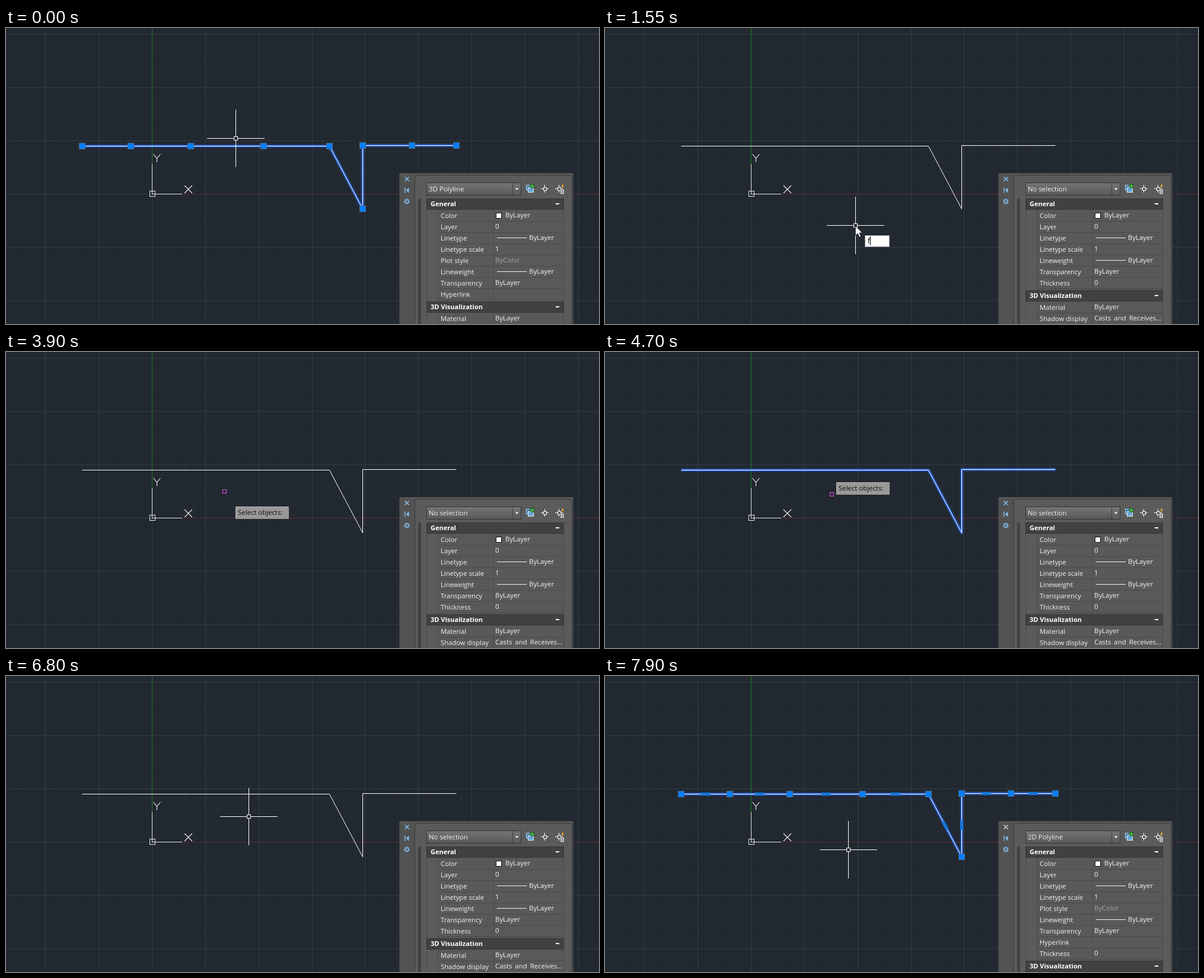
Recreate the animation shown at these times as an HTML page. Size 1000 px wide and 500 px high, loop 8 s.

```html
<!DOCTYPE html>
<html lang="en">
<head>
<meta charset="utf-8">
<title>Flatten a polyline</title>
<style>
  html, body { margin: 0; width: 100%; height: 100%; overflow: hidden; background: #212830; }
  svg { display: block; width: 100%; height: 100%; }
  text { font-family: "Open Sans", "Noto Sans", sans-serif; font-size: 11.4px; white-space: pre; }
  .crisp { shape-rendering: crispEdges; }
  .label { font-size: 11.2px; fill: #f2f2f2; }
  .value { fill: #f2f2f2; }
  .head { font-size: 11px; font-weight: 700; fill: #fff; }
  .entry { font-size: 11.8px; fill: #000; }
  .tip { fill: #0c0c0c; }
</style>
</head>
<body>
<svg viewBox="0 0 1000 500" xmlns="http://www.w3.org/2000/svg">
  <defs>
    <linearGradient id="combo" x1="0" y1="0" x2="0" y2="1">
      <stop offset="0" stop-color="#757575"/><stop offset="1" stop-color="#585858"/>
    </linearGradient>
  </defs>
  <g id="grid" class="crisp" fill="none"></g>
  <g id="ucs" fill="none" stroke="#e8e8e8"></g>
  <g id="glow" fill="none" stroke-linejoin="round"></g>
  <g id="line" fill="none"></g>
  <g id="grips" class="crisp"></g>
  <g id="mids" fill="#1676dc"></g>
  <g id="cross" class="crisp" fill="none"></g>
  <g id="panel"></g>
  <g id="arrow"><path d="M422.5 334.500v16l3.700-3.400 2.700 6.100 2.600-1.100-2.700-6.100h5z" fill="#fff" stroke="#20242a" stroke-width=".8"/></g>
  <g id="popup"></g>
  <g id="entry">
    <rect id="entryBox" x="438.500" y="350.500" height="19" fill="#fff" stroke="#8b8f94" class="crisp"/>
    <rect id="mark" y="352" height="16" fill="#3399ff"/>
    <text id="typed" class="entry" x="443" y="364"></text>
    <text id="rest" class="entry" y="364" style="fill:#fff"></text>
    <rect id="caret" y="352" width="1" height="15" fill="#000"/>
  </g>
  <g id="select"></g>
  <g id="prompt"></g>
</svg>
<script>
const LOOP = 8000, TICK = 50;
const $ = id => document.getElementById(id);
const rect = (x, y, w, h, more = "") => `<rect x="${x}" y="${y}" width="${w}" height="${h}" ${more}/>`;
const path = (d, more = "") => `<path d="${d}" ${more}/>`;
const text = (x, y, cls, s, more = "") => `<text x="${x}" y="${y}" class="${cls}" ${more}>${s}</text>`;
const show = (id, on) => { $(id).style.display = on ? "" : "none"; };
const within = (t, a, b) => t >= a && t < b;

// Cursor keys: time, x, y
const MOVES = [
  [0, 387, 186], [100, 424, 268], [200, 464, 354], [300, 464, 354], [400, 422, 333],
  [3750, 422, 333], [3850, 369, 243], [3900, 368, 235], [4000, 372, 202],
  [4650, 372, 202], [4700, 382, 240], [4750, 376, 257],
  [6600, 376, 257], [6650, 345, 252], [6700, 330, 248], [6750, 350, 245], [6800, 409, 237],
  [6950, 409, 237], [7100, 424, 101], [7250, 427, 199],
  [7600, 427, 199], [7750, 407, 279], [7850, 407, 279], [7900, 410, 293]
];

const VERTS = [[128, 199], [210, 199], [311, 199], [434, 199], [545, 199],
  [601, 305], [601, 198], [684, 198], [759, 198]];
const LINE = "M" + VERTS.map(([x, y]) => `${x + .5} ${y + .5}`).join("L");

const COMMAND = "flatten";
const KEY_TIMES = [1550, 1650, 1800, 1950, 2100, 2200, 2250];
const PLUGIN = "NELD_FLATTEN";

function drawScene() {
  const step = 89.85;
  const lines = (gap, skip) => {
    let d = "";
    for (let i = -14; i <= 42; i++) {
      if (skip && i % 5 === 0) continue;
      const x = Math.round(246 + i * gap) + .5, y = Math.round(280 + (i - 7) * gap) + .5;
      if (x > 0 && x < 1000) d += `M${x} 0V500`;
      if (skip || (i - 7) % 1 === 0) if (y > 0 && y < 500) d += `M0 ${y}H1000`;
    }
    return d;
  };
  $("grid").innerHTML =
    path(lines(step / 5, false), 'stroke="#262d37"') +
    path(lines(step, false), 'stroke="#323a47"') +
    path("M246.5 0V230", 'stroke="#1c791f"') +
    path("M297 280.5H1000", 'stroke="#6c262b"');
  $("ucs").innerHTML =
    path("M246.5 230V275M251 280.500H297M242.500 275.500h9v9h-9zM246.500 276v4.500h5", 'class="crisp"') +
    path("M248.500 213l6 7 6-7M254.500 220v6.500M301 266l13 13M314 266l-13 13", 'stroke-width="1.150"');

  $("glow").innerHTML = [[7, .16], [5, .38], [3, .8]].map(([w, o]) =>
    path(LINE, `stroke-width="${w}" stroke-opacity="${o}"`)).join("");
  $("line").innerHTML = path(LINE, 'stroke="#fff" stroke-linejoin="bevel"');
  $("grips").innerHTML = VERTS.map(([x, y]) =>
    rect(x - 4.5, y - 4.5, 10, 10, 'fill="#007fff" stroke="#50687f"')).join("");
  $("mids").innerHTML = VERTS.slice(1).map(([x, y], i) => {
    const [px, py] = VERTS[i];
    const a = Math.atan2(y - py, x - px) * 180 / Math.PI;
    return rect(-8, -2.5, 16, 5,
      `transform="translate(${(x + px) / 2 + .5} ${(y + py) / 2 + .5}) rotate(${a})"`);
  }).join("");
}

function drawDialogs() {
  $("popup").innerHTML =
    rect(438.5, 370.5, 139, 37, 'fill="#fff" stroke="#9a9a9a" class="crisp"') +
    '<rect id="pick" x="459" width="118" height="18" fill="#3399ff"/>' +
    path("M442 375l2-2h6v6l-2 2h-6zM442 375h6v6M448 375l2-2", 'fill="#e4e4e4" stroke="#777" stroke-width=".8"') +
    path("M443 383v4h4", 'fill="none" stroke="#e27aa0"') +
    rect(449.5, 380.5, 7, 7, 'fill="#b9d8f3" stroke="#2d6ea8"') +
    rect(442, 391, 14, 14, 'rx="1" fill="#1b80d4"') +
    text(461, 384, "entry", "FLATTEN", 'id="row0"') +
    text(461, 402, "entry", PLUGIN, 'id="row1"');

  const tip = (w, s) =>
    rect(.5, .5, w - 1, 22, 'fill="#999" stroke="#2b2b2b" class="crisp"') +
    path(`M1.500 21V1.500H${w - 2}`, 'fill="none" stroke="#b4b4b4" class="crisp"') +
    text(5, 14.5, "tip", s);
  $("select").innerHTML = tip(92, "Select objects:");
  $("prompt").innerHTML = `<g transform="translate(392 274)">${tip(171, "Specify target elevation &lt;0&gt; :")}</g>` +
    rect(566.5, 274.500, 19, 19, 'fill="#fff" stroke="#8b8f94" class="crisp"') +
    rect(571, 277, 8, 15, 'fill="#3399ff"') +
    text(571.5, 288, "entry", "0", 'style="fill:#fff"');
}

const ROWS = {
  none: "Color,Layer,Linetype,Linetype scale,Lineweight,Transparency,Thickness",
  poly3: "Color,Layer,Linetype,Linetype scale,Plot style,Lineweight,Transparency,Hyperlink",
  poly2: "Color,Layer,Linetype,Linetype scale,Plot style,Lineweight,Transparency,Hyperlink,Thickness"
};
const TITLES = { none: "No selection", poly3: "3D Polyline", poly2: "2D Polyline" };
const VALUES = { Layer: "0", "Linetype scale": "1", Thickness: "0", Hyperlink: "", "Plot style": "ByColor",
  "Shadow display": "Casts and Receives..." };

function rowMarkup(name, y) {
  let s = path(`M728 ${Math.round(y + 9) + .5}H941`, 'stroke="#4b4b4b" class="crisp"') +
    text(733, y + 4.5, "label", name);
  let x = 825, more = "";
  if (name === "Color") {
    s += rect(826.5, y - 4.5, 9, 9, 'fill="#fff" stroke="#111" class="crisp"');
    x = 842;
  } else if (name === "Linetype" || name === "Lineweight") {
    s += rect(828, Math.round(y - 1), 50, 1, 'fill="#f2f2f2"');
    x = 882;
  } else if (name === "Plot style") more = 'style="fill:#a2a2b0"';
  else if (name === "Shadow display") more = 'style="word-spacing:2px"';
  return s + text(x, y + 3.5, "value", VALUES[name] ?? "ByLayer", more);
}

function headMarkup(name, y) {
  return rect(709.5, Math.round(y - 9) + .5, 231, 18, 'fill="#414141" stroke="#363636" class="crisp"') +
    text(716, y + 4, "head", name) + rect(927, Math.round(y - 1), 6, 2, 'fill="#fff"');
}

function panelMarkup(kind) {
  const rows = ROWS[kind].split(","), gap = 19.05, top = 316.500;
  const next = top + rows.length * gap + 2.300;
  const blue = "#80b8e4";
  const target = (x, y) =>
    path(`M${x - 6} ${y}h4m5 0h4M${x + .5} ${y - 6.5}v4m0 5v4`, 'stroke="#fff" class="crisp"') +
    rect(x - 2, y - 2.500, 5, 5, 'fill="none" stroke="#fff" class="crisp"');
  let gear = "";
  for (let i = 0; i < 8; i++) gear += `<path d="M676 288v2.500" transform="rotate(${i * 45} 676 293)"/>`;

  return rect(663.5, 245.500, 293, 270, 'rx="2" fill="#525252" stroke="#414141"') +
    path("M664 246.500H956", 'stroke="#686868"') +
    rect(689.5, 248.500, 265, 270, 'rx="4" fill="#5b5b5b" stroke="#393939"') +
    rect(695, 288, 5, 212, 'fill="#414141"') +
    path("M672.500 251.500l7 7m0-7l-7 7", `stroke="${kind === "poly2" ? "#c4c4c4" : blue}" stroke-width="1.700"`) +
    path("M672 269.500h1.500v9h-1.500zM679.500 269.500v9l-5-4.500z", `fill="${blue}"`) +
    `<g fill="none" stroke="${blue}" stroke-width="1.500"><circle cx="676" cy="293" r="2.700"/>${gear}</g>` +
    rect(709.5, 261.500, 159, 21, 'fill="url(#combo)" stroke="#363636" class="crisp"') +
    path("M854.500 262v20", 'stroke="#404040" class="crisp"') +
    path("M858.500 270.500h6l-3 3.500z", 'fill="#eee"') +
    text(713, 276, "value", TITLES[kind]) +
    rect(877.5, 265.500, 8, 8, 'fill="#3e79a9" stroke="#b9daf1"') +
    rect(880.5, 269.500, 9, 8, 'fill="#69a7d5" stroke="#e4f1fa"') +
    path("M887.500 263v8m-4-4h8", 'stroke="#153d16" stroke-width="4"') +
    path("M887.500 263.500v7m-3.500-3.500h7", 'stroke="#48c64c" stroke-width="2"') +
    target(908, 271.500) + target(932, 271.500) +
    rect(935, 272.500, 6, 8, 'fill="#eee" stroke="#555" stroke-width=".600"') +
    path("M936 275h4m-4 2.500h4M938 273v7", 'stroke="#555" stroke-width=".800"') +
    path("M939 264l-3 4h2l-1 3 4-4h-2l1.500-3z", 'fill="#f2a33a"') +
    rect(728, 307, 213, 193, 'fill="#595959"') +
    path("M709.500 288V500M728.500 307V500M822.500 307V500M940.500 288V500", 'stroke="#4b4b4b" class="crisp"') +
    headMarkup("General", 297) +
    rows.map((name, i) => rowMarkup(name, top + i * gap)).join("") +
    headMarkup("3D Visualization", next) +
    rowMarkup("Material", next + 19.500) + rowMarkup("Shadow display", next + 38.500);
}

function cursorAt(t) {
  const i = MOVES.findIndex(k => k[0] > t);
  if (i < 0) return MOVES[MOVES.length - 1].slice(1);
  if (i === 0) return MOVES[0].slice(1);
  const [t0, x0, y0] = MOVES[i - 1], [t1, x1, y1] = MOVES[i];
  const f = (t - t0) / (t1 - t0);
  return [Math.round(x0 + (x1 - x0) * f), Math.round(y0 + (y1 - y0) * f)];
}

function drawCursor(t) {
  const [x, y] = cursorAt(t);
  const cx = x + .5, cy = y + .5;
  const picking = within(t, 3250, 5400), asking = within(t, 5400, 6200);
  const arms = picking ? "" :
    path(`M${x - 48} ${cy}h45m7 0h45M${cx} ${y - 48}v45m0 7v45`, 'stroke="#fff"');
  const color = picking || asking ? "#ee4cee" : "#fff";
  $("cross").innerHTML = arms + rect(x - 2.5, y - 2.5, 6, 6, `stroke="${color}"`);

  // The tooltip trails the cursor by one tick
  const [lx, ly] = cursorAt(t - TICK);
  $("select").setAttribute("transform", `translate(${lx + 17} ${ly + 17})`);
  show("select", within(t, 3300, 5350));
  show("prompt", asking);
}

function drawLine(t) {
  const hover = within(t, 4000, 4400) || within(t, 7250, 7450);
  const selected = t < 1000 || within(t, 4400, 5350) || t >= 7450;
  const fading = within(t, 900, 1000);
  show("glow", hover || selected);
  $("glow").setAttribute("stroke", hover ? "#8f9cab" : "#2666e8");
  $("glow").setAttribute("opacity", fading ? .5 : 1);
  show("grips", t < 850 || t >= 7550);
  show("mids", t >= 7550);
}

function drawEntry(t) {
  const open = within(t, 1550, 3200), list = within(t, 2600, 3200), second = t >= 2900;
  show("entry", open);
  show("arrow", open);
  show("popup", list);
  if (!open) return;
  const typed = second ? PLUGIN.slice(0, 7) : list ? COMMAND.toUpperCase()
    : COMMAND.slice(0, KEY_TIMES.filter(k => k <= t).length);
  const rest = second ? PLUGIN.slice(7) : "";
  $("typed").textContent = typed;
  $("rest").textContent = rest;
  const end = 443 + $("typed").getComputedTextLength();
  const tail = rest ? $("rest").getComputedTextLength() : 0;
  $("rest").setAttribute("x", end);
  $("mark").setAttribute("x", end);
  $("mark").setAttribute("width", tail);
  $("caret").setAttribute("x", Math.round(end + tail));
  $("entryBox").setAttribute("width", Math.max(41, Math.round(end + tail - 443 + 12)));
  $("pick").setAttribute("y", second ? 389 : 371);
  $("row0").style.fill = second ? "#000" : "#fff";
  $("row1").style.fill = second ? "#fff" : "#000";
}

let panelKind = "";
function drawPanel(t) {
  const kind = t < 950 ? "poly3" : t < 7500 ? "none" : "poly2";
  if (kind === panelKind) return;
  panelKind = kind;
  $("panel").innerHTML = panelMarkup(kind);
}

function render(ms) {
  const t = Math.floor((ms % LOOP) / TICK) * TICK;
  drawLine(t);
  drawCursor(t);
  drawEntry(t);
  drawPanel(t);
}

drawScene();
drawDialogs();
const start = performance.now();
function frame() {
  render(performance.now() - start);
  requestAnimationFrame(frame);
}
frame();
</script>
</body>
</html>
```
